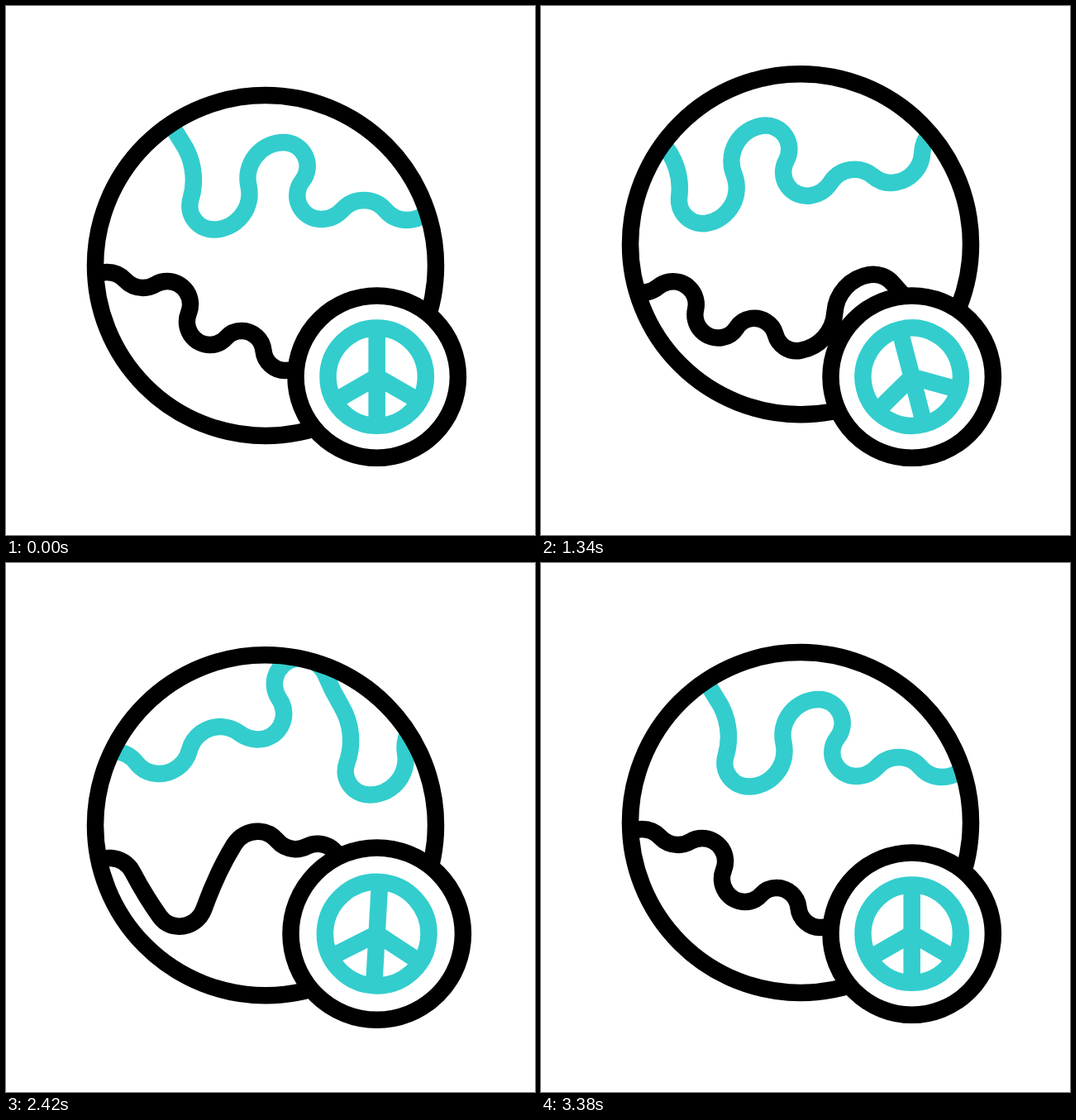
These frames come from a looping animation (640x640 px, 3.4 s). An HTML page:

```html
<!DOCTYPE html>
<html lang="en">
<head>
<meta charset="utf-8">
<title>Peaceful globe</title>
<style>
  html, body { margin: 0; width: 100%; height: 100%; overflow: hidden; background: #fff; }
  svg { display: block; width: 100vw; height: 100vh; }
  svg * { fill: none; stroke: #000; stroke-width: 20.5; }
  .teal { stroke: #33cdcd; }
  .paper { fill: #fff; }
</style>
</head>
<body>
<svg viewBox="0 0 640 640">
  <defs>
    <clipPath id="disc"><circle cx="314" cy="314" r="207"/></clipPath>
  </defs>
  <g id="globe">
    <g clip-path="url(#disc)">
      <g id="coasts">
        <path id="north" class="teal"/>
        <path id="south"/>
      </g>
    </g>
    <circle cx="314" cy="314" r="206"/>
  </g>
  <circle id="badge" class="paper" cx="448.7" cy="448.6"/>
  <g id="peace">
    <circle id="ring" class="teal"/>
    <path id="bars" class="teal"/>
  </g>
</svg>
<script>
const LOOP = 3400, PERIOD = 490;
const $ = id => document.getElementById(id);
const dot = (a, b) => a[0] * b[0] + a[1] * b[1];
const cross = (a, b) => a[0] * b[1] - a[1] * b[0];
const minus = (a, b) => [a[0] - b[0], a[1] - b[1]];

// Crests and troughs of one period: x, y and heading in degrees (level by default)
const north = [[162, 110], [213, 165, 56], [251, 270.5], [336, 165], [381, 258],
  [433, 235], [485, 259], [560, 198], [603, 211]];
const south = [[122, 322], [166, 341], [195, 333], [247, 410], [285, 393],
  [338, 441], [435, 364], [481, 409, 55], [520, 442], [566, 375, -68]];

function arc(chord, tangent, sweep, end) {
  const r = dot(chord, chord) / (2 * Math.abs(cross(tangent, chord)));
  return `A${r} ${r} 0 0 ${+sweep} ${end}`;
}

// Two tangent circular arcs that meet the position and heading at both ends
function bend(p, s, q, e) {
  const v = minus(q, p), along = dot(v, s) + dot(v, e), turn = 2 * (1 - dot(s, e));
  const d = turn < 1e-6
    ? dot(v, v) / (4 * dot(v, e))
    : (Math.sqrt(along ** 2 + turn * dot(v, v)) - along) / turn;
  const joint = [0, 1].map(i => (p[i] + q[i] + d * (s[i] - e[i])) / 2);
  const a = minus(joint, p), b = minus(q, joint);
  return arc(a, s, cross(s, a) > 0, joint) + arc(b, e, cross(b, e) > 0, q);
}

function coastline(points) {
  const keys = [-1, 0, 1, 2].flatMap(k => points.map(([x, y, heading = 0]) => {
    const angle = heading * Math.PI / 180;
    return { at: [x + k * PERIOD, y], dir: [Math.cos(angle), Math.sin(angle)] };
  }));
  return keys.slice(1).reduce(
    (d, key, i) => d + bend(keys[i].at, keys[i].dir, key.at, key.dir), `M${keys[0].at}`);
}

// Bezier easing with horizontal handles
function ease(x, x1, x2) {
  if (x <= 0) return 0;
  let lo = 0, hi = 1;
  for (let i = 0; i < 30; i++) {
    const u = (lo + hi) / 2, w = 1 - u;
    if (3 * w * w * u * x1 + 3 * w * u * u * x2 + u ** 3 < x) lo = u; else hi = u;
  }
  return lo * lo * (3 - 2 * lo);
}

// Moves from 0 through stops of [end time, value, handles]
function glide(t, start, ...stops) {
  let from = 0;
  for (const [end, to, x1 = 0.42, x2 = 0.58] of stops) {
    if (t < end) return from + (to - from) * ease((t - start) / (end - start), x1, x2);
    [start, from] = [end, to];
  }
  return from;
}

// Slow wind-up, quick swing past rest, then settle
const swing = (t, back, over, x1, x2) =>
  glide(t, 220, [2070, back, x1, x2], [2700, over, 0.3, 0.36], [3380, 0]);

function draw(t) {
  const scroll = glide(t, 220, [3380, PERIOD, 0.8, 0.6]);
  const lift = swing(t, -55.5, 19.5, 0.45, 0.9);
  const tilt = swing(t, -18, 9, 0.5, 0.75);
  const turn = swing(t, -32, 13, 0.62, 0.73);
  const grow = glide(t, 1860, [2210, 19.5], [2700, -3, 0.4, 0.29], [3060, 0]);

  $('globe').setAttribute('transform', `translate(0 ${lift})`);
  $('coasts').setAttribute('transform', `rotate(${tilt} 314 314) translate(${-scroll} 0)`);

  const r = 59.2 + grow * 0.6, x = r * Math.cos(Math.PI / 6), y = r / 2;
  $('badge').setAttribute('r', 98.2 + grow);
  $('ring').setAttribute('r', r);
  $('bars').setAttribute('d', `M0 ${-r}V${r}M${-x} ${y}L0 0L${x} ${y}`);
  $('peace').setAttribute('transform', `translate(448.7 448.6) rotate(${turn})`);
}

function tick() {
  draw(performance.now() % LOOP);
  requestAnimationFrame(tick);
}

$('north').setAttribute('d', coastline(north));
$('south').setAttribute('d', coastline(south));
tick();
</script>
</body>
</html>
```
